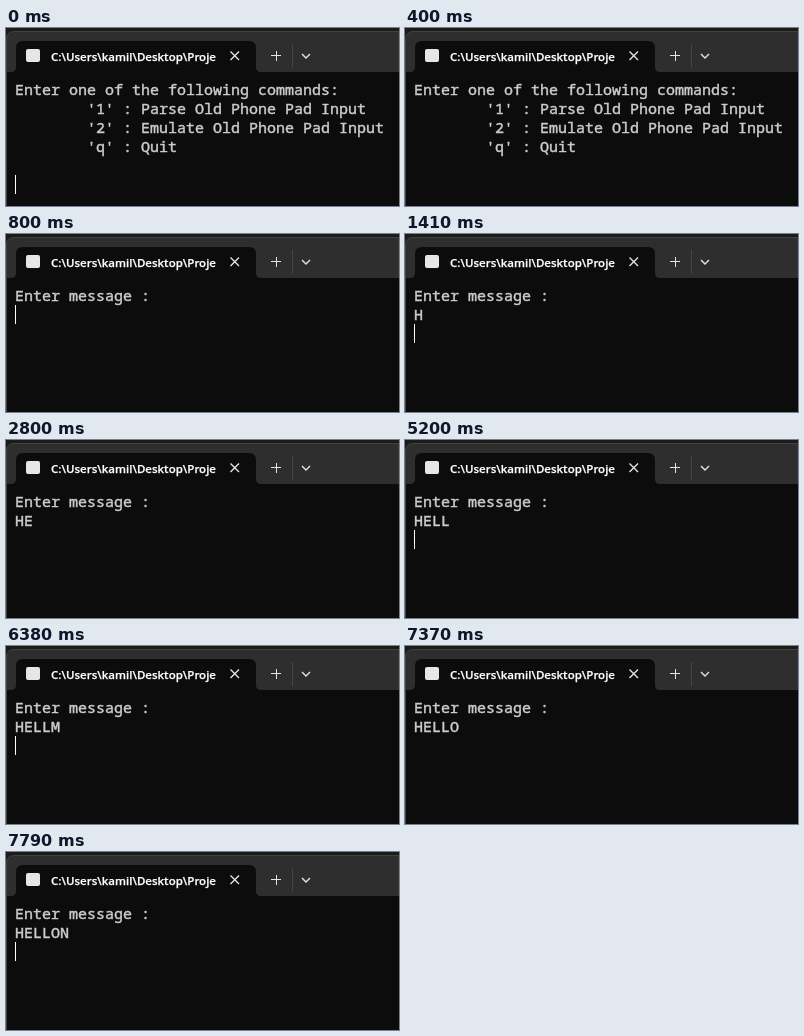
Write an HTML page that moves like this. It is 393 by 178 pixels and loops after 7990 ms.

```html
<!DOCTYPE html>
<html lang="en">
<head>
<meta charset="utf-8">
<title>Phone pad console</title>
<style>
  html, body { margin: 0; width: 100%; height: 100%; overflow: hidden; background: #0c0c0c; }
  svg { display: block; }
  .console { font: 15px "Noto Sans Mono", "DejaVu Sans Mono", monospace; fill: #ccc; stroke: #ccc; stroke-width: .45; }
  .title { font: 600 11.5px "Open Sans", "Noto Sans", sans-serif; fill: #fff; stroke: #fff; stroke-width: .25; }
  .icons { fill: none; stroke: #e4e4e4; stroke-width: 1.4; }
  .icons .thin { stroke-width: 1; }
</style>
</head>
<body>
<svg width="393" height="178" viewBox="0 0 393 178">
  <rect width="393" height="178" fill="#1b1b19"/>
  <path d="M.5 178V10.5a7 7 0 0 1 7-7H393V178z" fill="#2e2e2e" stroke="#424242"/>
  <rect x="1" y="44" width="392" height="134" fill="#0c0c0c"/>
  <path d="M5 44q5 0 5-5V20q0-7 7-7H243q7 0 7 7v19q0 5 5 5z" fill="#0c0c0c"/>
  <rect x="20" y="21" width="14" height="13" rx="2" fill="#e6e6e6"/>
  <text class="title" x="45" y="33">C:\Users\kamil\Desktop\Proje</text>
  <g class="icons">
    <path d="M224.5 23.5l8.5 8.5m0-8.5l-8.5 8.5"/>
    <path class="thin" d="M265 27.5h10M270.5 23v10"/>
    <path class="thin" d="M286.5 16v24" stroke="#454545"/>
    <path d="M296 26l4 4 4-4"/>
  </g>
  <g class="console">
    <g id="menu">
      <text x="9" y="67">Enter one of the following commands:</text>
      <text x="81" y="86">'1' : Parse Old Phone Pad Input</text>
      <text x="81" y="105">'2' : Emulate Old Phone Pad Input</text>
      <text x="81" y="124">'q' : Quit</text>
    </g>
    <g id="entry" visibility="hidden">
      <text x="9" y="67">Enter message :</text>
      <text id="message" x="9" y="86"></text>
    </g>
  </g>
  <rect id="cursor" x="9" y="147" width="1" height="19" fill="#fff"/>
</svg>
<script>
  const LOOP = 7990, TOP = 52, LINE = 19, ENTRY_START = 800;
  const get = id => document.getElementById(id);
  const menu = get("menu"), entry = get("entry"), message = get("message"), cursor = get("cursor");

  // [start ms, typed text]: repeated key presses cycle the last letter
  const typed = [
    [0, ""], [1210, "G"], [1410, "H"], [2010, "HD"], [2200, "HE"],
    [3400, "HEJ"], [3610, "HEK"], [3810, "HEL"],
    [4800, "HELJ"], [5000, "HELK"], [5200, "HELL"],
    [6380, "HELLM"], [6580, "HELLN"], [6780, "HELLO"],
    [7590, "HELLOM"], [7790, "HELLON"]
  ];

  // [start ms, cursor row], -1 while blinked off
  const rows = [
    [0, 5], [400, -1], [800, 1], [1210, 2], [2800, -1], [3000, 2],
    [4410, -1], [4800, 2], [5790, -1], [6380, 2], [7370, -1], [7590, 2]
  ];

  const at = (track, t) => track.findLast(([start]) => start <= t)[1];
  const show = (el, on) => el.setAttribute("visibility", on ? "visible" : "hidden");

  function draw(now) {
    const t = now % LOOP, row = at(rows, t);
    show(menu, t < ENTRY_START);
    show(entry, t >= ENTRY_START);
    message.textContent = at(typed, t);
    show(cursor, row >= 0);
    cursor.setAttribute("y", TOP + LINE * row);
  }

  const origin = performance.now();
  function tick() {
    draw(performance.now() - origin);
    requestAnimationFrame(tick);
  }
  tick();
</script>
</body>
</html>
```
